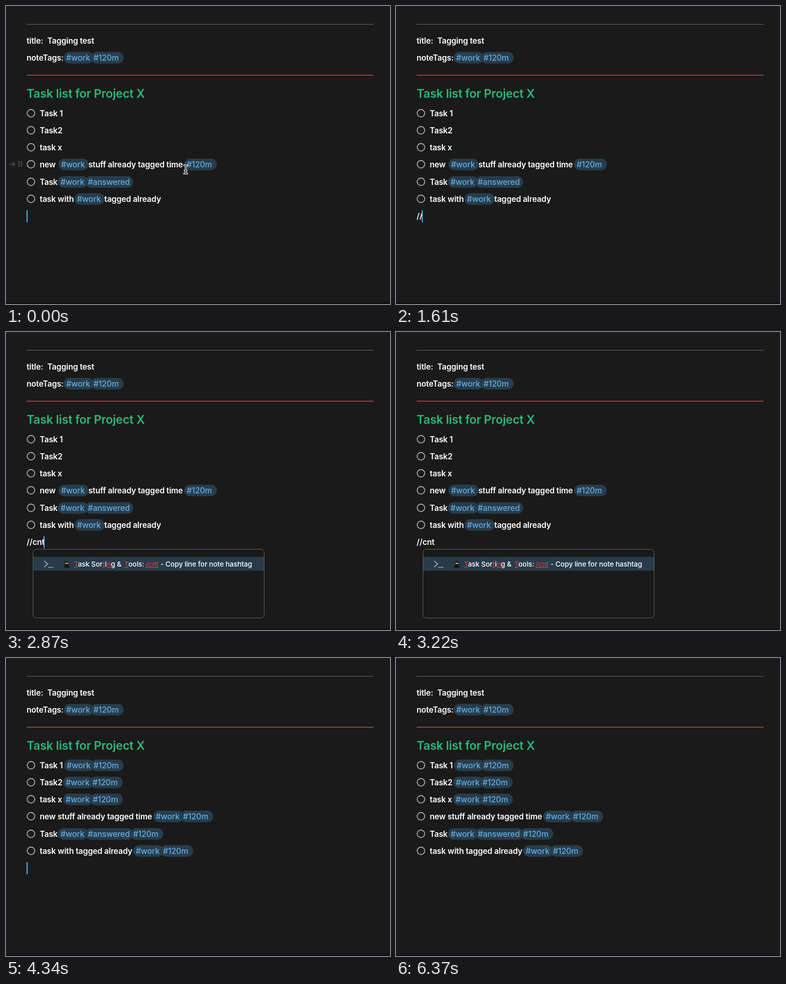
An HTML page that plays this animation: 746x578 px, repeating every 6580 ms.

```html
<!DOCTYPE html>
<html lang="en">
<head>
<meta charset="utf-8">
<title>Tagging test</title>
<style>
html, body { margin: 0; width: 100%; height: 100%; overflow: hidden; background: #1a1a1a; }
svg { display: block; width: 746px; height: 578px; }
text { font: 560 15.5px Inter, "Open Sans", sans-serif; letter-spacing: -.17px; fill: #fff; white-space: pre; }
.tag { fill: #5fb0ea; font-weight: 500; letter-spacing: -.1px; }
.heading { font-size: 23px; font-weight: 640; letter-spacing: -.24px; fill: #2cb67d; }
.menu { font-size: 13.5px; font-weight: 500; letter-spacing: -.06px; }
.hit { fill: #d9363c; text-decoration: underline; }
</style>
</head>
<body>
<svg id="stage" viewBox="0 0 746 578">
  <rect width="746" height="578" fill="#1a1a1a"/>
  <rect y="575" width="746" height="3" fill="#140e12"/>
  <path d="M40 35.5H714" stroke="#75615e"/>
  <path d="M40 134.300H714" stroke="#b24f49" stroke-width="1.400"/>
  <text class="heading" x="40" y="178">Task list for Project X</text>
  <g id="header"></g>
  <g id="circles" fill="none" stroke="#a0a0a0" stroke-width="1.9"></g>
  <g id="before"></g>
  <g id="after"></g>
  <text id="typed" x="40" y="413"></text>
  <rect id="caret" y="396" width="2" height="23.5" fill="#5aade6"/>
  <g id="menu">
    <rect x="52.5" y="421.5" width="449" height="133" rx="6" fill="#191919" stroke="#626262"/>
    <rect x="53" y="436" width="448" height="27" fill="#283b4a"/>
    <path d="M74 444l7 6-7 6M82 456.5h10" fill="none" stroke="#97a3ab" stroke-width="1.7"/>
    <circle cx="118" cy="449" r="4.6" fill="#141414"/>
    <path d="M112 457q0-4 6-4t6 4z" fill="#141414"/>
    <rect x="115" y="447.5" width="6.5" height="2.6" rx="1.2" fill="#d9a441"/>
    <text class="menu" x="132" y="455"><tspan class="hit">T</tspan>ask Sor<tspan class="hit">t</tspan>i<tspan class="hit">n</tspan>g &amp;</text>
    <text class="menu" x="230" y="455"><tspan class="hit">T</tspan>ools:</text>
    <text class="menu hit" x="271" y="455">/cnt</text>
    <text class="menu" x="300" y="455">- Copy line for note hashtag</text>
  </g>
  <g id="gutter">
    <path id="arrow" d="M6.5 0H17M12.5-4.5L17 0l-4.5 4.5" fill="none" stroke="#555" stroke-width="1.4"/>
    <path id="plus" d="M6.5 .5H17M11.75-4.75V5.75" stroke="#b0b0b0" stroke-width="1.4"/>
    <g id="dots"></g>
  </g>
  <g id="mouse" fill="none" stroke-linecap="round"></g>
</svg>
<script>
const $ = id => document.getElementById(id);
const LOOP = 6580, STEP = 70;
const ROWS = [208, 241, 274, 307, 341, 374, 407];
const TAG_WIDTH = { '#work': 58.5, '#120m': 63.5, '#answered': 93 };

function add(parent, name, attrs, text = '') {
  const el = document.createElementNS('http://www.w3.org/2000/svg', name);
  for (const key in attrs) el.setAttribute(key, attrs[key]);
  el.textContent = text;
  return parent.appendChild(el);
}

// A line is a flat list of x, text pairs; hashtags get a pill.
function line(parent, y, ...parts) {
  for (let i = 0; i < parts.length; i += 2) {
    const x = parts[i], width = TAG_WIDTH[parts[i + 1]];
    if (width) add(parent, 'rect', { x: x - 5, y: y - 11, width, height: 22.5, rx: 11, fill: '#283c4a' });
  }
  for (let i = 0; i < parts.length; i += 2) {
    const x = parts[i], text = parts[i + 1];
    add(parent, 'text', { x, y: y + 5.7, class: TAG_WIDTH[text] ? 'tag' : 'plain' }, text);
  }
}

line($('header'), 67, 40, 'title:', 80.3, 'Tagging test');
line($('header'), 100, 40, 'noteTags:', 117, '#work', 170, '#120m');

[
  [65.5, 'Task 1'],
  [65.5, 'Task2'],
  [65.5, 'task x'],
  [65.5, 'new', 107, '#work', 160, 'stuff already tagged time', 351, '#120m'],
  [65.5, 'Task', 106, '#work', 159, '#answered'],
  [65.5, 'task with', 138, '#work', 191, 'tagged already']
].forEach((parts, i) => line($('before'), ROWS[i], ...parts));

[
  [65.5, 'Task 1', 118, '#work', 170, '#120m'],
  [65.5, 'Task2', 116, '#work', 168, '#120m'],
  [65.5, 'task x', 116, '#work', 168.5, '#120m'],
  [65.5, 'new stuff already tagged time', 291, '#work', 344, '#120m'],
  [65.5, 'Task', 106, '#work', 159, '#answered', 247, '#120m'],
  [65.5, 'task with tagged already', 252, '#work', 305, '#120m']
].forEach((parts, i) => line($('after'), ROWS[i], ...parts));

for (const cy of ROWS.slice(0, 6)) add($('circles'), 'circle', { cx: 48.5, cy, r: 7.3 });
for (const cx of [25.3, 30.5])
  for (const cy of [-4.8, -.8, 3.2]) add($('dots'), 'circle', { cx, cy, r: 1.4 });

const BEAM = 'M-3-8Q0-8 0-5.5Q0-8 3-8M0-5.5V5.5M-3 8Q0 8 0 5.5Q0 8 3 8M-2 2.5H2';
add($('mouse'), 'path', { d: BEAM, stroke: '#f4f4f4', 'stroke-width': 3.4 });
add($('mouse'), 'path', { d: BEAM, stroke: '#111', 'stroke-width': 1.2 });

const KEYS = [1400, 1540, 2100, 2310, 2520];
const CARET_X = [40, 45, 50, 58.5, 68, 73];
// Alternating times at which the caret goes off and on.
const BLINKS = [350, 1050, 1890, 2100, 3080, 3430, 4970, 5530, 6090];

const clamp = v => Math.min(1, Math.max(0, v));
const ease = v => v * v * (3 - 2 * v);
const show = (id, on) => $(id).setAttribute('display', on ? 'inline' : 'none');
const between = (t, a, b) => t >= a && t < b;

function caretAlpha(t) {
  const count = BLINKS.filter(b => t >= b).length;
  if (!count) return 1;
  const fade = clamp((t - BLINKS[count - 1] + STEP) / 140);
  return count % 2 ? 1 - fade : fade;
}

function mouseAt(t) {
  if (t < 1400) {
    const p = ease(clamp(t / 490));
    return [349 - 123 * p, 317 + 97 * p];
  }
  const p = ease(clamp((t - 5250) / 700));
  return [226 + 40 * p, 414 + 110 * p];
}

function draw(t) {
  const typed = between(t, 1400, 3850) ? KEYS.filter(k => t >= k).length : 0;
  $('typed').textContent = '//cnt'.slice(0, typed);
  $('caret').setAttribute('x', CARET_X[typed]);
  $('caret').setAttribute('opacity', caretAlpha(t));

  show('before', t < 4060);
  show('after', t >= 4060);
  show('menu', between(t, 2870, 3850));

  const hover = t < 1400 || between(t, 5250, 6300);
  show('mouse', hover);
  show('gutter', hover);
  const [x, y] = mouseAt(t);
  $('mouse').setAttribute('transform', `translate(${x} ${y})`);
  const row = ROWS.find(r => y < r + 16.5) || ROWS[6];
  const last = row === ROWS[6];
  $('gutter').setAttribute('transform', `translate(0 ${row})`);
  show('arrow', !last);
  show('plus', last);
  $('dots').setAttribute('fill', last ? '#a0a0a0' : '#5a5a5a');
}

const start = performance.now();
function tick() {
  const t = (performance.now() - start) % LOOP;
  draw(Math.floor(t / STEP) * STEP);
  requestAnimationFrame(tick);
}
tick();
</script>
</body>
</html>
```
